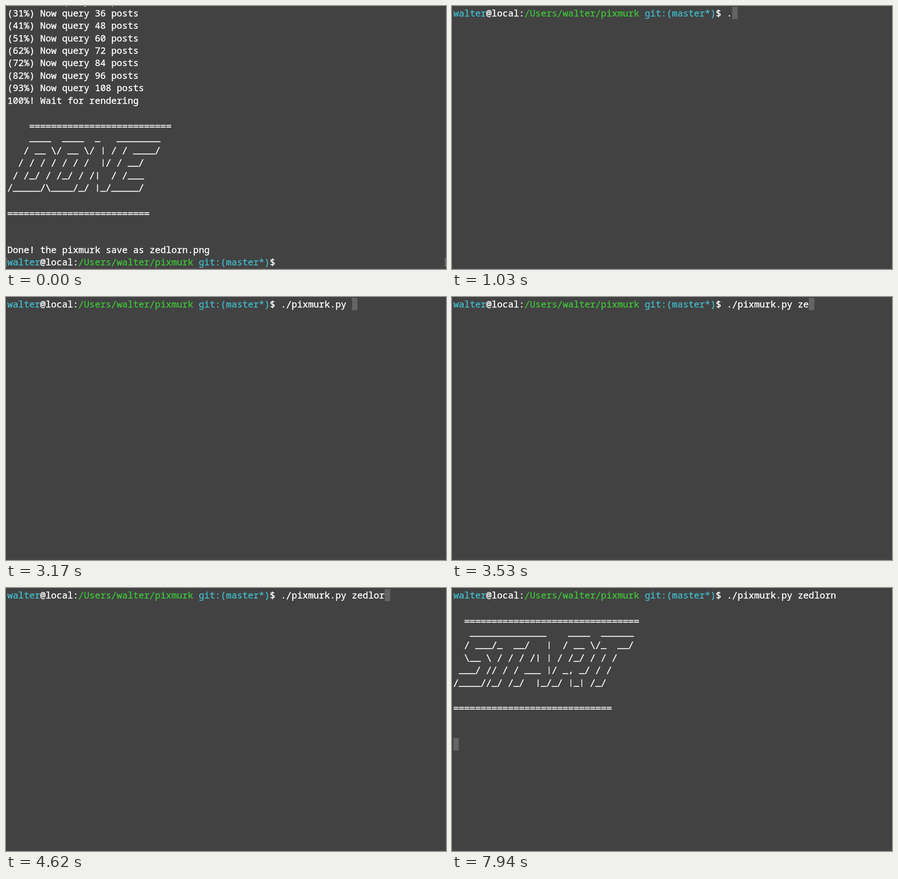
An HTML page with a canvas for the animation above (8 s loop, 969x578 px).

```html
<!DOCTYPE html>
<html lang="en">
<head>
<meta charset="utf-8">
<title>Terminal</title>
<style>
  html, body { margin: 0; width: 100%; height: 100%; overflow: hidden; background: #424242; }
  canvas { display: block; }
</style>
</head>
<body>
<canvas id="stage" width="969" height="578"></canvas>
<script>
const ctx = document.getElementById('stage').getContext('2d');
const LOOP = 8000, CELL = 12.04, ROW = 27.37, LEFT = 3, BASE = 23;
const WHITE = '#fff', CYAN = '#42bac8', GREEN = '#40c13a';
const USER = 'walter', TOOL = 'pixmurk', TARGET = 'zedlorn';
const COMMAND = `./${TOOL}.py ${TARGET}`;
const PROMPT_END = 50;

const TEXT = { font: '20.067px "Noto Sans Mono", monospace', lift: 0 };
const WIDE = { font: '20px "DejaVu Sans Mono", monospace', lift: 0 };
// Symbols that fill their cell, so that the banners join up
const SYMBOLS = {
  '/': WIDE,
  '\\': WIDE,
  '=': { ...WIDE, lift: -1 },
  '_': { ...TEXT, lift: 1 },
  '|': { font: '16px "DejaVu Sans Mono", monospace', lift: 2 }
};

// [time, number of command characters visible]
const KEYS = [
  [520, 0], [1030, 1], [1410, 2], [1510, 3], [2140, 4], [3170, 13], [3360, 14],
  [3530, 15], [3800, 16], [4040, 17], [4360, 18], [4620, 19], [5100, 20]
];
const CLEAR = 340, ENTER = 5200, BANNER = 7940;

const START = [
  '  ' + '='.repeat(32),
  '   ______________    ____  ______',
  '  / ___/_  __/   |  / __ \\/_  __/',
  '  \\__ \\ / / / /| | / /_/ / / /',
  ' ___/ // / / ___ |/ _, _/ / /',
  '/____//_/ /_/  |_/_/ |_| /_/',
  '',
  '='.repeat(29)
];
const DONE = [
  '    ' + '='.repeat(26),
  '    ____  ____  _   ________',
  '   / __ \\/ __ \\/ | / / ____/',
  '  / / / / / / /  |/ / __/',
  ' / /_/ / /_/ / /|  / /___',
  '/_____/\\____/_/ |_/_____/',
  '',
  '='.repeat(26)
];

function write(text, row, col = 0, color = WHITE) {
  ctx.fillStyle = ctx.strokeStyle = color;
  ctx.lineWidth = 0.45;
  ctx.lineJoin = 'round';
  ctx.textAlign = 'center';
  [...text].forEach((ch, i) => {
    const { font, lift } = SYMBOLS[ch] || TEXT;
    const x = LEFT + (col + i + 0.5) * CELL, y = BASE + row * ROW - lift;
    ctx.font = font;
    ctx.fillText(ch, x, y);
    ctx.strokeText(ch, x, y);
  });
}

function writeLines(lines, row) {
  lines.forEach((line, i) => write(line, row + i));
}

function prompt(row) {
  let col = 0;
  for (const [text, color] of [
    [USER, CYAN], ['@local:', WHITE], [`/Users/${USER}/${TOOL} `, GREEN],
    ['git:(master*)', CYAN], ['$', WHITE]
  ]) {
    write(text, row, col, color);
    col += text.length;
  }
}

function cursor(row, col) {
  ctx.fillStyle = '#646464';
  ctx.fillRect(Math.round(3 + col * CELL), Math.round(2 + row * ROW), 12, 27);
}

function bracket(x, dir) {
  ctx.strokeStyle = '#999';
  ctx.lineWidth = 1;
  ctx.beginPath();
  ctx.moveTo(x + 2 * dir, 554.5);
  ctx.lineTo(x, 554.5);
  ctx.lineTo(x, 571.5);
  ctx.lineTo(x + 2 * dir, 571.5);
  ctx.stroke();
}

function finishedRun() {
  for (let row = -1; row < 7; row++) {
    const posts = 36 + row * 12;
    write(`(${Math.floor(posts / 1.16)}%) Now query ${posts} posts`, row);
  }
  write('100%! Wait for rendering', 7);
  writeLines(DONE, 9);
  write(`Done! the ${TOOL} save as ${TARGET}.png`, 19);
  prompt(20);
  bracket(0.5, 1);
  bracket(967.5, -1);
}

function draw(t) {
  ctx.fillStyle = '#424242';
  ctx.fillRect(0, 0, 969, 578);
  ctx.fillStyle = '#4a4346';
  ctx.fillRect(0, 575, 969, 3);

  if (t < CLEAR) return finishedRun();

  const key = KEYS.filter(([time]) => time <= t).pop();
  if (!key) return cursor(0, 0);

  prompt(0);
  write(COMMAND.slice(0, key[1]), 0, PROMPT_END);
  if (t < ENTER) {
    cursor(0, PROMPT_END + key[1]);
  } else if (t < BANNER) {
    cursor(1, 0);
  } else {
    writeLines(START, 2);
    cursor(12, 0);
  }
}

const begin = performance.now();
function tick() {
  draw((performance.now() - begin) % LOOP);
  requestAnimationFrame(tick);
}
tick();
</script>
</body>
</html>
```
